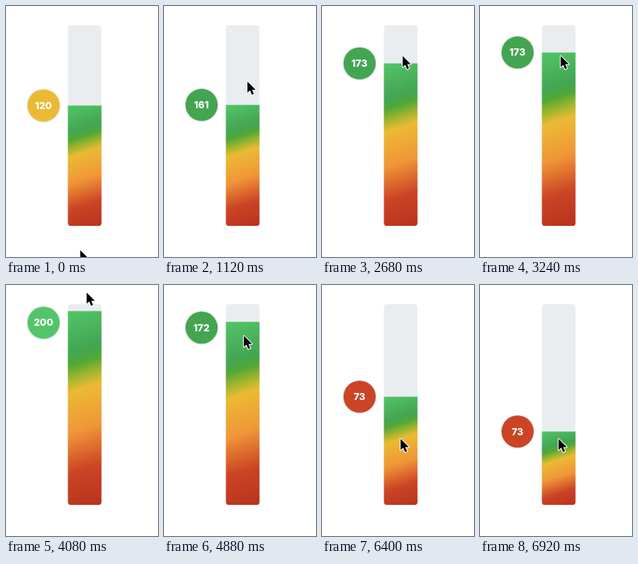
An HTML page that plays this animation: 190x314 px, repeating every 7000 ms.

```html
<!DOCTYPE html>
<html lang="en">
<head>
<meta charset="utf-8">
<title>Gradient level slider</title>
<style>
  html, body { margin: 0; width: 100%; height: 100%; overflow: hidden; background: #fff; }
  svg { display: block; width: 100vw; height: 100vh; }
  text { font: 800 12px Inter, Arial, sans-serif; fill: #fff; text-anchor: middle; }
</style>
</head>
<body>
<svg viewBox="0 0 190 314">
  <defs>
    <linearGradient id="heat" gradientUnits="userSpaceOnUse"></linearGradient>
    <clipPath id="barClip"><rect id="barShape" rx="4"/></clipPath>
  </defs>
  <g clip-path="url(#barClip)">
    <rect width="190" height="314" fill="#e9edf0"/>
    <rect id="fill" width="190" fill="url(#heat)"/>
  </g>
  <g id="badge">
    <circle r="21.5" fill="#e9edec"/>
    <circle id="disc" r="20.1"/>
    <text id="label" x="-.2" y="4.2"></text>
  </g>
  <path id="cursor" d="M.8 1.6V15.6L4 12.5L6.4 18L8.8 17L6.5 11.7H11Z"
        fill="#000" stroke="#fff" stroke-width="2" stroke-linejoin="round" paint-order="stroke"/>
</svg>
<script>
const LOOP = 7000, GLIDE = 800;
const BAR = { x: 77.4, y: 24, width: 42, height: 251.3 };
const BOTTOM = BAR.y + BAR.height;
const BADGE_MIN = 43.6;
const TILT = -18 * Math.PI / 180;

const RED = '#cb4425', ORANGE = '#f09637', YELLOW = '#ebba34', GREEN = '#43a552', MINT = '#52c568';
const STOPS = {
  0: '#b8321f', .2: RED, .4: ORANGE, .6: YELLOW,
  .67: '#9ab42d', .73: '#52a836', .79: GREEN, 1: MINT
};

// Each click sets a value with the pointer tip at x, y
const clicks = [
  { at: 0, value: 120, x: 92, y: 304 },
  { at: 1050, value: 161, x: 103.5, y: 93 },
  { at: 2520, value: 173, x: 100, y: 61 },
  { at: 3560, value: 200, x: 100, y: 8 },
  { at: 4420, value: 172, x: 99, y: 62 },
  { at: 5310, value: 116, x: 98, y: 132 },
  { at: 6160, value: 73, x: 97.5, y: 191 }
];

const $ = id => document.getElementById(id);
const set = (node, attrs) => {
  for (const key in attrs) node.setAttribute(key, attrs[key]);
};
const mix = (a, b, p) => a + (b - a) * p;
const clamp = p => Math.min(1, Math.max(0, p));
const smooth = p => p * p * (3 - 2 * p);
const levelY = value => BOTTOM - BAR.height * value / 200;
const badgeY = value => Math.max(BADGE_MIN, levelY(value));

// Cubic ease-in-out with control points at x .42 and .58
function easeInOut(p) {
  let lo = 0, hi = 1;
  for (let i = 0; i < 18; i++) {
    const s = (lo + hi) / 2, r = 1 - s;
    if (3 * r * r * s * .42 + 3 * r * s * s * .58 + s ** 3 < p) lo = s;
    else hi = s;
  }
  return smooth(lo);
}

const valueColor = value => [RED, RED, ORANGE, YELLOW, GREEN, MINT][Math.floor(value / 40)];

// Longer trips take longer; each one ends just after its click
function pointerAt(t) {
  let { x, y } = clicks[0];
  for (const click of clicks.slice(1)) {
    const travel = 160 + 4 * Math.hypot(click.x - x, click.y - y);
    const p = smooth(clamp((t - click.at - 60) / travel + 1));
    if (p < 1) return [mix(x, click.x, p), mix(y, click.y, p)];
    ({ x, y } = click);
  }
  return [x, y];
}

function paintFill(y) {
  const h = BOTTOM - y, cx = BAR.x + BAR.width / 2, cy = (y + BOTTOM) / 2;
  const sin = Math.sin(TILT), cos = Math.cos(TILT);
  const half = (h * cos + BAR.width * Math.abs(sin)) / 2;
  set($('fill'), { y, height: h });
  set($('heat'), {
    x1: cx - sin * half, y1: cy + cos * half,
    x2: cx + sin * half, y2: cy - cos * half
  });
}

function render(t) {
  const i = clicks.filter(click => click.at <= t).length - 1;
  const { at, value } = clicks[i];
  const previous = clicks[Math.max(0, i - 1)].value;
  const p = easeInOut(clamp((t - at) / GLIDE));
  const glide = place => i ? mix(place(previous), place(value), p) : place(value);

  paintFill(glide(levelY));
  set($('badge'), { transform: `translate(47 ${glide(badgeY)})` });
  set($('disc'), { fill: valueColor(value) });
  $('label').textContent = value;
  set($('cursor'), { transform: `translate(${pointerAt(t).join(' ')})` });
}

set($('barShape'), BAR);
$('heat').innerHTML = Object.entries(STOPS)
  .sort((a, b) => a[0] - b[0])
  .map(([offset, color]) => `<stop offset="${offset}" stop-color="${color}"/>`).join('');

const origin = performance.now();
function tick() {
  render((performance.now() - origin) % LOOP);
  requestAnimationFrame(tick);
}
tick();
</script>
</body>
</html>
```
